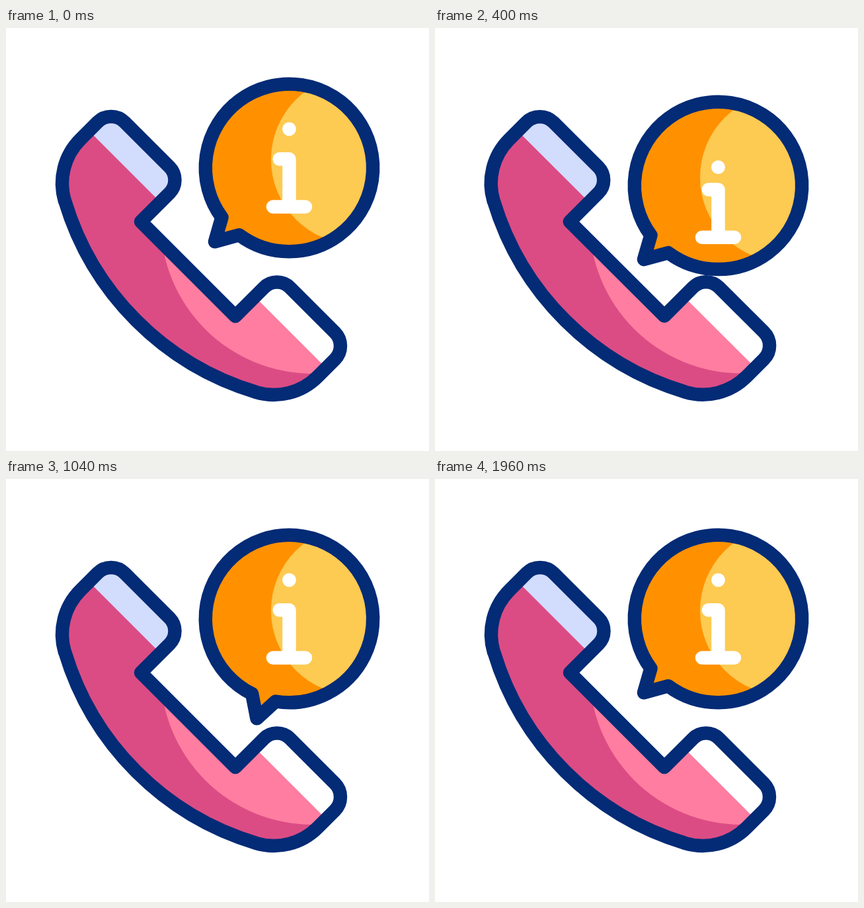
Write an HTML page with a canvas that moves like this. It is 640x640 px and loops after 2 s.

```html
<!DOCTYPE html>
<html>
<head>
<meta charset="utf-8">
<style>
  html, body { margin: 0; width: 100%; height: 100%; overflow: hidden; background: #fff; }
  canvas { display: block; width: 100vmin; height: 100vmin; }
</style>
</head>
<body>
<canvas id="stage" width="640" height="640"></canvas>
<script>
const ctx = document.getElementById('stage').getContext('2d');
const LOOP = 2000, RAD = Math.PI / 180, LINE = 20.5;
const NAVY = '#032b76', ROSE = '#db4c84', PINK = '#fe7da0', ICE = '#d2dcfd';
const ORANGE = '#ff9100', YELLOW = '#fdca52', WHITE = '#fff';
const PIVOT = [233, 407];
const BUBBLE = { x: 428.5, y: 211.5, r: 126.7 };

// [time, value] keys with smooth interpolation
const SHAKE = [[0, 0], [112, 4.2], [228, -4.2], [335, 4.2], [465, -4.2], [600, 0]];
const TAIL = [[720, 0], [1035, -27.2], [1167, -27.2], [1475, 18.6], [1610, 18.6], [1950, 0]];

function tween(keys, t) {
  if (t <= keys[0][0]) return keys[0][1];
  for (let i = 1; i < keys.length; i++) {
    const [t0, a] = keys[i - 1], [t1, b] = keys[i];
    if (t < t1) {
      const s = (t - t0) / (t1 - t0);
      return a + (b - a) * s * s * (3 - 2 * s);
    }
  }
  return keys[keys.length - 1][1];
}

function dip(t) {
  const half = 332;
  return t < 2 * half ? (1 - Math.cos(Math.PI * t / half)) / 2 : 0;
}

function disc(x, y, r, color) {
  ctx.fillStyle = color;
  ctx.beginPath();
  ctx.arc(x, y, r, 0, 2 * Math.PI);
  ctx.fill();
}

function poly(color, ...pts) {
  ctx.fillStyle = color;
  ctx.beginPath();
  pts.forEach(p => ctx.lineTo(...p));
  ctx.fill();
}

function outline(path, color) {
  ctx.strokeStyle = color;
  ctx.lineWidth = LINE;
  ctx.lineCap = ctx.lineJoin = 'round';
  ctx.stroke(path);
}

// The handset is symmetric about the line x + y = 640
function phonePath() {
  const p = new Path2D();
  const arc = (x, y, r, a, b) => p.arc(x, y, r, a * RAD, b * RAD);
  const back = 163.3;
  p.moveTo(347, 436);
  p.lineTo(204, 293);
  arc(227.7, 230, 27.8, 45, -45);
  arc2(159, 163, 29, -45, -135);
  arc2(179, 235, 94, -135, -180 - (180 - back));
  arc2(502, 138, 431, back, 270 - back);
  arc2(405, 461, 94, 270 - back, 45);
  arc2(477, 481, 29, 45, -45);
  arc2(410, 412.3, 27.8, -45, -135);
  p.closePath();
  function arc2(x, y, r, a, b) { p.arc(x, y, r, a * RAD, b * RAD, true); }
  return p;
}

function capPath() {
  const p = new Path2D();
  const arc = (x, y, r, a, b) => p.arc(x, y, r, a * RAD, b * RAD, true);
  const back = 163.3;
  p.moveTo(347, 436);
  p.lineTo(204, 293);
  arc(227.7, 230, 27.8, 45, -45);
  arc(159, 163, 29, -45, -135);
  arc(179, 235, 94, -135, back - 360);
  arc(502, 138, 431, back, 270 - back);
  arc(405, 461, 94, 270 - back, 45);
  arc(477, 481, 29, 45, -45);
  arc(410, 412.3, 27.8, -45, -135);
  p.closePath();
  return p;
}
const PHONE = capPath();

function drawPhone(angle) {
  ctx.save();
  ctx.translate(...PIVOT);
  ctx.rotate(angle * RAD);
  ctx.translate(-PIVOT[0], -PIVOT[1]);
  ctx.save();
  ctx.clip(PHONE);
  ctx.fillStyle = ROSE;
  ctx.fillRect(0, 0, 640, 640);
  disc(464, 293, 230, PINK);
  // left end stays clear of the highlight
  poly(ROSE, [0, 0], [320, 0], [320, 230], [204, 293], [0, 293]);
  poly(ICE, [70, 100], [305, 335], [405, 235], [170, 0]);
  poly(WHITE, [305, 335], [540, 570], [640, 470], [405, 235]);
  ctx.restore();
  outline(PHONE, NAVY);
  ctx.restore();
}

function bubblePath(turn) {
  const { x, y, r } = BUBBLE;
  const p = new Path2D();
  const tip = (135.2 + turn) * RAD;
  p.arc(x, y, r, (143.6 + turn) * RAD, (126.6 + turn + 360) * RAD);
  p.lineTo(x + 158.6 * Math.cos(tip), y + 158.6 * Math.sin(tip));
  p.closePath();
  return p;
}

function drawBubble(turn) {
  const path = bubblePath(turn);
  ctx.fillStyle = ORANGE;
  ctx.fill(path);
  ctx.save();
  ctx.beginPath();
  ctx.arc(BUBBLE.x, BUBBLE.y, BUBBLE.r, 0, 2 * Math.PI);
  ctx.clip();
  disc(529, 199, 128, YELLOW);
  ctx.restore();
  outline(path, NAVY);
}

const LETTER = new Path2D('M413.8 198.3H428.5V270.6M404 270.6H453');

function shifted(dy, draw) {
  ctx.save();
  ctx.translate(0, dy);
  draw();
  ctx.restore();
}

function render(t) {
  const d = dip(t);
  ctx.fillStyle = WHITE;
  ctx.fillRect(0, 0, 640, 640);
  drawPhone(tween(SHAKE, t));
  shifted(30 * d, () => drawBubble(tween(TAIL, t)));
  shifted(51.5 * d, () => outline(LETTER, WHITE));
  shifted(64.5 * d, () => disc(428.5, 152.8, 10.4, WHITE));
}

const start = performance.now();
function frame() {
  render((performance.now() - start) % LOOP);
  requestAnimationFrame(frame);
}
render(0);
requestAnimationFrame(frame);
</script>
</body>
</html>
```
